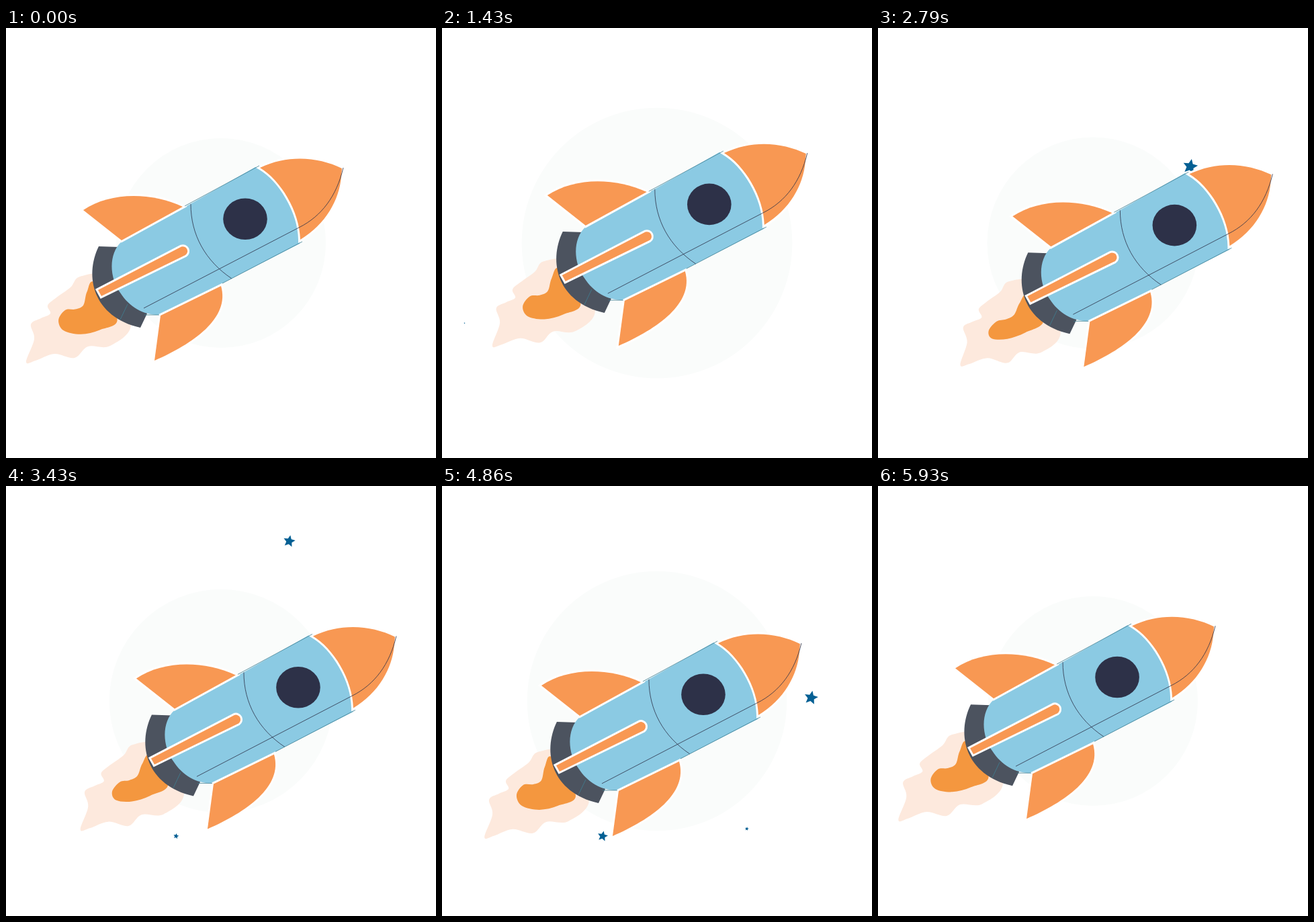
Animation of 640 by 640 pixels, one loop 6000 ms. Source, as an HTML page with a canvas:

```html
<!DOCTYPE html>
<html lang="en">
<head>
<meta charset="utf-8">
<title>Rocket</title>
<style>
  html, body { margin: 0; width: 100%; height: 100%; overflow: hidden; background: #fff; }
  canvas { display: block; width: 640px; height: 640px; }
</style>
</head>
<body>
<canvas id="stage" width="640" height="640"></canvas>
<script>
const ctx = document.getElementById('stage').getContext('2d');
const LOOP = 6000, LEG = 1500;
const ORANGE = '#f89853', BLUE = '#8bcae3', NAVY = '#2d3148', STAR = '#056094';

const mix = (a, b, u) => a + (b - a) * u;
const wave = u => (1 - Math.cos(2 * Math.PI * u)) / 2;
const shape = d => new Path2D(d);

// Corners of the flight, each with the bow of the leg that follows
const CORNERS = [
  { x: 0, y: 0, bowX: 0, bowY: 0 },
  { x: 42, y: -22, bowX: 0, bowY: -6 },
  { x: 87.5, y: 12, bowX: 0, bowY: 0 },
  { x: 42.5, y: 30, bowX: -8, bowY: 0 }
];

// birth, start x, start y, pace
const STARS = [
  [270, 505, 20, 1], [315, 346, 216, 1], [690, 568, 97, 1], [1440, 605, 401, 1],
  [2190, 633, 86, 1], [2180, 483, 357, .81], [3090, 517, 14, 1], [3380, 338, 272, 1],
  [3795, 620, 123, 1], [3990, 483, 347, 1], [4430, 670, 229, 1], [4745, 475, 495, .81],
  [5180, 568, 118, 1]
];

const OUTER = smooth([
  150,372, 110,370, 96,386, 74,402, 62,413, 66,425, 52,432, 37,441, 42,463,
  30,497, 44,495, 72,485, 102,491, 122,474, 155,473, 186,440
]);
const INNER = smooth([
  131,378, 120,392, 115,412, 103,418, 88,419, 78,434, 86,450, 112,456, 140,450, 166,434
]);

const ENGINE = shape('M138 325C116 370 130 430 200 446L210 425L180 380L168 326Z');
const BODY = shape('M172 318C152 336 154 372 170 394C184 416 206 428 230 427L437 321L445 295L415 230L378 207L371 207L262 269Z');
const NOSE = shape('M378 208C420 188 465 192 500 209L499 221C496 256 476 292 438 315C437 272 408 226 378 208Z');
const TOP_FIN = shape('M115 271C155 244 215 244 263 266L172 316Z');
const LOW_FIN = shape('M320 384C334 432 278 470 221 495L230 428Z');
const BAR = shape('M137 390L261 325.5A7 7 0 0 1 267 338L142 399Z');
const SEAMS = shape('M502 208C492 250 470 280 436 297L205 417M275 262C275 308 297 347 336 373');
const EDGES = shape('M266 265L377 205M322 380L441 318M206 427L228 427M181 411L170 434');

// Closed smooth curve through a ring of points
function smooth(ring) {
  const n = ring.length / 2, p = new Path2D();
  const at = (i, k) => ring[(i + n) % n * 2 + k];
  p.moveTo(at(0, 0), at(0, 1));
  for (let i = 0; i < n; i++) {
    const near = k => at(i, k) + (at(i + 1, k) - at(i - 1, k)) / 6;
    const far = k => at(i + 1, k) - (at(i + 2, k) - at(i, k)) / 6;
    p.bezierCurveTo(near(0), near(1), far(0), far(1), at(i + 1, 0), at(i + 1, 1));
  }
  return p;
}

function line(path, color, width) {
  ctx.strokeStyle = color;
  ctx.lineWidth = width;
  ctx.stroke(path);
}

function fill(path, color, outline) {
  if (outline) line(path, '#fff', outline);
  ctx.fillStyle = color;
  ctx.fill(path);
}

function disc(x, y, rx, ry, color) {
  const p = new Path2D();
  p.ellipse(x, y, rx, ry, 0, 0, 2 * Math.PI);
  fill(p, color);
}

// Flames stretch along and across the rocket's axis.
function flame(path, along, across, color) {
  const x = 150, y = 410, tilt = 2.53;
  ctx.save();
  ctx.translate(x, y);
  ctx.rotate(tilt);
  ctx.scale(along, across);
  ctx.rotate(-tilt);
  ctx.translate(-x, -y);
  fill(path, color);
  ctx.restore();
}

// Slower stars live longer and travel less far.
function star([birth, x0, y0, pace], t) {
  const u = (t - birth) * pace / 1150;
  if (u <= 0 || u >= 1) return;
  const x = x0 - 322 * pace * u, y = y0 + 230 * pace * u;
  const size = 11.5 * Math.sin(Math.PI * u), p = new Path2D();
  for (let i = 0; i < 10; i++) {
    const a = i * Math.PI / 5 - 1.38, r = i % 2 ? size * .47 : size;
    p.lineTo(x + r * Math.cos(a), y + r * Math.sin(a));
  }
  p.closePath();
  fill(p, STAR);
}

function position(t) {
  const i = Math.floor(t / LEG), u = wave(t % LEG / LEG / 2), arch = 4 * u * (1 - u);
  const a = CORNERS[i], b = CORNERS[(i + 1) % CORNERS.length];
  return [mix(a.x, b.x, u) + a.bowX * arch, mix(a.y, b.y, u) + a.bowY * arch];
}

function rocket(t) {
  const beat = t / 1200, sway = wave(beat), pinch = wave(beat - .07);
  flame(OUTER, 1 - .08 * sway, 1 + .05 * sway, '#fde9dd');
  flame(INNER, 1 + .08 * pinch, 1 - .6 * pinch, '#f4973f');
  fill(ENGINE, '#4c535f');
  fill(BODY, BLUE);
  fill(TOP_FIN, ORANGE, 6);
  fill(LOW_FIN, ORANGE, 6);
  fill(NOSE, ORANGE, 6);
  disc(356, 284.3, 32.8, 30.8, NAVY);
  line(SEAMS, NAVY, .8);
  line(EDGES, '#3f7f92', .8);
  fill(BAR, ORANGE, 6);
}

function draw(t) {
  ctx.clearRect(0, 0, 640, 640);
  const r = 156 + 45.5 * wave(t / 2965);
  disc(320, 320, r, r, '#fafcfb');
  STARS.forEach(s => star(s, t));
  ctx.save();
  ctx.translate(...position(t));
  rocket(t);
  ctx.restore();
}

const start = performance.now();
function tick() {
  draw((performance.now() - start) % LOOP);
  requestAnimationFrame(tick);
}
tick();
</script>
</body>
</html>
```
